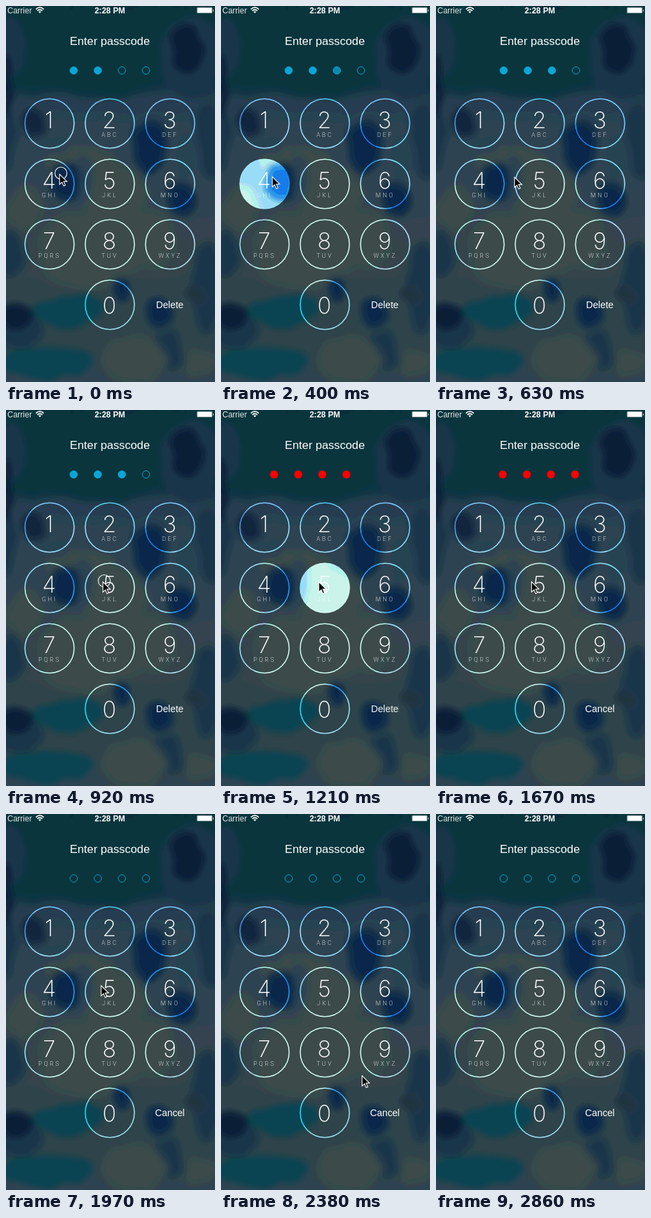
Recreate the animation shown at these times as an HTML page. Size 312 by 560 pixels, loop 3770 ms.

```html
<!DOCTYPE html>
<html lang="en">
<head>
<meta charset="utf-8">
<title>Passcode screen</title>
<style>
  html, body { margin: 0; width: 100%; height: 100%; overflow: hidden; background: #23394a; }
  svg { position: absolute; left: 0; top: 0; width: 312px; height: 560px; }
  .layer { will-change: opacity; }
  text { fill: #fff; text-anchor: middle; font-family: "Liberation Sans", Arial, sans-serif; }
  .digit { font: 250 34px Inter, Roboto, sans-serif; }
  .letters { font: 300 9px Roboto, Inter, sans-serif; letter-spacing: 2.7px; opacity: .75; }
</style>
</head>
<body>
<svg class="layer" viewBox="0 0 312 560">
  <defs>
    <filter id="soften" filterUnits="userSpaceOnUse" x="-40" y="-40" width="392" height="640" color-interpolation-filters="sRGB">
      <feTurbulence type="fractalNoise" baseFrequency=".02" numOctaves="2" seed="8" result="noise"/>
      <feDisplacementMap in="SourceGraphic" in2="noise" scale="22" xChannelSelector="R" yChannelSelector="G"/>
      <feGaussianBlur stdDeviation="5"/>
      <feComponentTransfer id="bands"/>
    </filter>
    <filter id="brighten" filterUnits="userSpaceOnUse" x="-40" y="-40" width="392" height="640" color-interpolation-filters="sRGB">
      <feComponentTransfer>
        <feFuncR type="linear" slope="3.7" intercept="-.05"/>
        <feFuncG type="linear" slope="3.4"/>
        <feFuncB type="linear" slope="2" intercept=".37"/>
      </feComponentTransfer>
    </filter>
    <linearGradient id="base" x2="0" y2="1">
      <stop offset="0" stop-color="#08313c"/>
      <stop offset=".25" stop-color="#0a333f"/>
      <stop offset=".28" stop-color="#283e50"/>
      <stop offset=".38" stop-color="#2d4350"/>
      <stop offset=".65" stop-color="#34464d"/>
      <stop offset=".8" stop-color="#2c434d"/>
      <stop offset="1" stop-color="#32454e"/>
    </linearGradient>
  </defs>
  <g id="wall" filter="url(#soften)"><rect x="-40" y="-40" width="392" height="640" fill="url(#base)"/></g>
</svg>

<svg id="screen" viewBox="0 0 312 560">
  <text x="2" y="11" font-size="12" style="text-anchor:start" fill-opacity=".88">Carrier</text>
  <g fill="none" stroke="#fff" stroke-width="1.7">
    <path d="M44.6 4.8Q50.5 -.4 56.4 4.8M46.7 7.1Q50.5 3.9 54.3 7.1"/>
    <path d="M48.5 8.4Q50.5 6.9 52.5 8.4L50.5 10.7Z" fill="#fff" stroke="none"/>
  </g>
  <text x="155" y="11" font-size="12.1" font-weight="bold">2:28 PM</text>
  <rect x="284.8" y="1.8" width="23.4" height="9.2" rx="1.6" fill="#fff" fill-opacity=".4"/>
  <rect x="285.8" y="2.8" width="21.4" height="7.2" rx=".8" fill="#fff"/>
  <path d="M309 4.5q1.6 2 0 4z" fill="#fff"/>
  <text x="155" y="58" font-size="17.2">Enter passcode</text>
  <g id="dots"></g>
  <g id="keys"></g>
  <text id="delete" x="244.5" y="450" font-size="14.2">Delete</text>
  <text id="cancel" x="244.7" y="450" font-size="14.2">Cancel</text>
  <g id="cursor">
    <circle id="clickRing" cx="2" cy="-1.5" r="9" fill="none" stroke="#fff" stroke-width="1.1"/>
    <path d="M0 0V15.2L3.6 11.9L6.2 17.6L8.6 16.5L6.1 10.9H11Z" fill="#000" stroke="#fff" stroke-width="1.1"/>
  </g>
</svg>

<script>
const LOOP = 3770;
const $ = id => document.getElementById(id);

function add(parent, tag, attrs, text) {
  const node = document.createElementNS('http://www.w3.org/2000/svg', tag);
  for (const name in attrs) node.setAttribute(name, attrs[name]);
  if (text) node.textContent = text;
  parent.appendChild(node);
  return node;
}

// Wallpaper: colour, then ellipses as cx cy rx ry
const patches = [
  ['#1c374c', '8 62 20 45', '275 78 45 66', '304 200 22 60', '4 200 14 50', '20 480 34 36', '8 370 18 38', '302 420 22 70', '242 512 24 32'],
  ['#39494c', '110 235 50 28', '125 365 80 60', '160 285 50 50', '28 300 28 32', '215 345 40 40', '190 525 48 38', '290 530 24 20'],
  ['#0a343f', '140 112 88 22'],
  ['#2a4152', '116 258 13 32', '268 225 20 38', '70 205 26 14'],
  ['#0d2a48', '213 208 25 40', '88 262 24 30', '262 288 23 25', '228 457 21 21', '176 425 15 13'],
  ['#0a464e', '92 455 54 24', '60 532 70 22'],
  ['#0d2138', '268 62 25 40', '2 120 7 50', '16 463 26 24'],
  ['#14283f', '38 174 15 23'],
  ['#22343f', '285 430 14 11']
];
for (const [fill, ...places] of patches)
  for (const place of places) {
    const [cx, cy, rx, ry] = place.split(' ');
    add($('wall'), 'ellipse', { cx, cy, rx, ry, fill });
  }
const levels = Array.from({ length: 36 }, (_, i) => (i + .5) / 36).join(' ');
for (const channel of 'RGB') add($('bands'), 'feFunc' + channel, { type: 'discrete', tableValues: levels });

// The keys let a bright version of the wallpaper through.
function brightLayer(id) {
  const svg = add(document.body, 'svg', { class: 'layer', viewBox: '0 0 312 560' });
  document.body.insertBefore(svg, $('screen'));
  const mask = add(svg, 'mask', { id, maskUnits: 'userSpaceOnUse', x: 0, y: 0, width: 312, height: 560 });
  const view = add(svg, 'g', { mask: `url(#${id})` });
  add(add(view, 'g', { filter: 'url(#brighten)' }), 'use', { href: '#wall' });
  return { svg, mask };
}

const letters = ['', 'ABC', 'DEF', 'GHI', 'JKL', 'MNO', 'PQRS', 'TUV', 'WXYZ', ''];
const rims = brightLayer('rims');
const glows = { 4: brightLayer('glow4'), 5: brightLayer('glow5') };

letters.forEach((label, i) => {
  const digit = (i + 1) % 10;
  const cx = digit ? 65 + i % 3 * 90 : 155;
  const cy = 175 + Math.floor(i / 3) * 90;
  add(rims.mask, 'circle', { cx, cy, r: 36.7, fill: 'none', stroke: '#fff', 'stroke-width': 1.6 });
  if (glows[digit]) add(glows[digit].mask, 'circle', { cx, cy, r: 37, fill: '#fff' });
  add($('keys'), 'text', { class: 'digit', x: cx - .7, y: cy + (digit ? 7 : 13) }, String(digit));
  add($('keys'), 'text', { class: 'letters', x: cx, y: cy + 20 }, label);
});

const dots = [0, 1, 2, 3].map(i => add($('dots'), 'circle', { cx: 101 + i * 36, cy: 96, r: 5.5, stroke: '#0aa2d2' }));
const redDots = add($('dots'), 'g', { fill: '#fe0000' });
for (const i of dots.keys()) add(redDots, 'circle', { cx: 101 + i * 36, cy: 96, r: 6 });

const clamp = v => Math.min(1, Math.max(0, v));
const ease = (t, from, to) => {
  const p = clamp((t - from) / (to - from));
  return p * p * (3 - 2 * p);
};
const pulse = (t, on, off) => ease(t, on, on + 150) * (1 - ease(t, off, off + 250));

// Every swing goes half as far as the one before, to the other side.
function shakeOffset(t) {
  const swing = 94, step = Math.floor((t - 1165) / swing);
  if (step < 0 || step > 6) return 0;
  const reach = n => n < 0 || n > 5 ? 0 : -45 * (-.5) ** n;
  const start = 1165 + step * swing;
  return reach(step - 1) + (reach(step) - reach(step - 1)) * ease(t, start, start + swing);
}

// Pointer path: time, x, y
const path = [
  [0, 80, 250.5], [60, 79, 251], [250, 76.5, 254], [480, 76.5, 254.5], [630, 117, 255],
  [760, 144, 256], [1210, 146, 256], [1500, 143, 256], [2220, 141.5, 255.5], [2320, 178, 326],
  [2380, 210.5, 389.5], [2520, 222, 440], [2740, 230.5, 479.5], [2800, 266, 541], [2860, 285, 575]
];
function pointer(t) {
  const i = path.findIndex(p => p[0] > t);
  if (i < 0) return [285, 580];
  const [t0, x0, y0] = path[i - 1], [t1, x1, y1] = path[i];
  const p = (t - t0) / (t1 - t0);
  return [x0 + (x1 - x0) * p, y0 + (y1 - y0) * p];
}

function render(t) {
  glows[4].svg.style.opacity = pulse(t, 50, 370);
  glows[5].svg.style.opacity = pulse(t, 930, 1180);

  const failed = t >= 1165;
  const fills = failed ? [0, 0, 0, 0] : [1, 1, ease(t, 320, 440), 0];
  const red = failed ? 1 - ease(t, 1750, 1990) : 0;
  dots.forEach((dot, i) => {
    dot.setAttribute('fill', `rgba(11,166,214,${fills[i]})`);
    dot.setAttribute('stroke-opacity', 1 - red);
  });
  redDots.setAttribute('opacity', red);
  $('dots').setAttribute('transform', `translate(${shakeOffset(t)} 0)`);

  const swap = ease(t, 1165, 1420);
  $('delete').setAttribute('opacity', 1 - swap);
  $('cancel').setAttribute('opacity', swap);

  $('cursor').setAttribute('transform', `translate(${pointer(t)})`);
  $('cursor').setAttribute('opacity', t < 2860 ? 1 : 0);
  $('clickRing').setAttribute('opacity', t < 230 || t >= 890 && t < 1120 ? 1 : 0);
}

const began = performance.now();
function tick() {
  render((performance.now() - began) % LOOP);
  requestAnimationFrame(tick);
}
tick();
</script>
</body>
</html>
```
